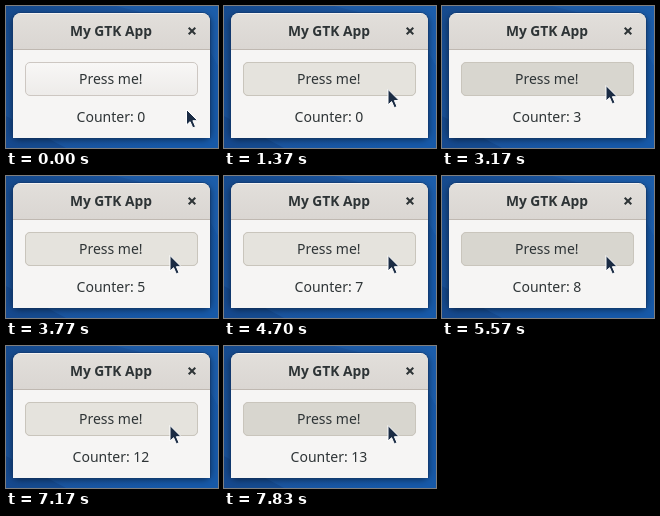
Animation of 212x142 px, one loop 8 s. Source, as an HTML page:

```html
<!DOCTYPE html>
<html lang="en">
<head>
<meta charset="utf-8">
<style>
  html, body { margin: 0; width: 100%; height: 100%; overflow: hidden; }
  svg { display: block; width: 212px; height: 142px; }
  text { font: 14px "Noto Sans", sans-serif; text-anchor: middle; fill: #2e3436; }
  .title { font-size: 13.8px; font-weight: 700; }
</style>
</head>
<body>
<svg viewBox="0 0 212 142">
  <defs>
    <linearGradient id="sky" x2="1" y2=".5">
      <stop stop-color="#164a8d"/><stop offset=".5" stop-color="#1b549d"/><stop offset="1" stop-color="#1759a8"/>
    </linearGradient>
    <linearGradient id="header" x2="0" y2="1">
      <stop stop-color="#e2dfdb"/><stop offset="1" stop-color="#dad6d2"/>
    </linearGradient>
    <linearGradient id="face" x2="0" y2="1">
      <stop stop-color="#f8f7f6"/><stop offset="1" stop-color="#edebe9"/>
    </linearGradient>
    <filter id="blur" x="-20%" y="-20%" width="140%" height="140%"><feGaussianBlur stdDeviation="3"/></filter>
  </defs>

  <rect width="212" height="142" fill="url(#sky)"/>
  <path d="M110 0H212V60L190 20Z" fill="#2468b5" opacity=".35"/>
  <path d="M0 142V110L60 142Z" fill="#103d7c" opacity=".4"/>
  <rect x="6" y="9" width="199" height="125" rx="8" opacity=".45" filter="url(#blur)"/>

  <path d="M6 132V15a9 9 0 0 1 9-9H196a9 9 0 0 1 9 9V132Z" fill="#123a70" opacity=".6"/>
  <path d="M7 132V15a8 8 0 0 1 8-8H196a8 8 0 0 1 8 8V132Z" fill="#f6f5f4"/>
  <path d="M7 43V15a8 8 0 0 1 8-8H196a8 8 0 0 1 8 8V43Z" fill="url(#header)"/>
  <path d="M14 7.5H197" stroke="#f4f2f1"/>
  <path d="M7 43.5H204" stroke="#bfb8b1"/>
  <text class="title" x="105" y="30">My GTK App</text>
  <path d="M182.7 21.7l6.6 6.6m0-6.6l-6.6 6.6" stroke="#2e3436" stroke-width="2"/>

  <rect x="19.5" y="56.5" width="172" height="33" rx="4.5" fill="url(#face)" stroke="#cdc7c2"/>
  <rect id="tint" x="19.5" y="56.5" width="172" height="33" rx="4.5" stroke="#c9c5bc"/>
  <text x="104.8" y="78">Press me!</text>
  <text id="counter" x="105" y="116"></text>

  <path id="cursor" d="M0 0V15.5L3.6 12.2L6.3 18.4L9 17.2L6.4 11.2H11.2Z"
        fill="#1b2c44" stroke="#fff" stroke-linejoin="round"/>
</svg>
<script>
const LOOP = 8000;
// Each click is [press, release] in ms; the counter rises on release.
const clicks = [
  [1570, 1700], [2170, 2300], [2700, 2830], [3170, 3300], [3570, 3770],
  [4170, 4230], [4630, 4700], [5170, 5230], [5570, 5830], [6170, 6300],
  [6500, 6770], [7100, 7170], [7570, 7630], [7830, LOOP]
];
const [tint, counter, cursor] = ["tint", "counter", "cursor"].map(id => document.getElementById(id));
const progress = (t, from, to) => Math.min(1, Math.max(0, (t - from) / (to - from)));

function draw(t) {
  const x = 180.5 - 16.5 * progress(t, 700, 1350);
  const y = 103.5 - 24 * progress(t, 700, 1500);
  cursor.setAttribute("transform", `translate(${x} ${y})`);

  const pressed = clicks.some(([down, up]) => t >= down && t < up);
  tint.setAttribute("fill", pressed ? "#d8d6cf" : "#e5e3dd");
  tint.setAttribute("opacity", progress(t, 1150, 1330));
  counter.textContent = "Counter: " + clicks.filter(([, up]) => t >= up).length;
}

function tick() {
  draw(performance.now() % LOOP);
  requestAnimationFrame(tick);
}
tick();
</script>
</body>
</html>
```
